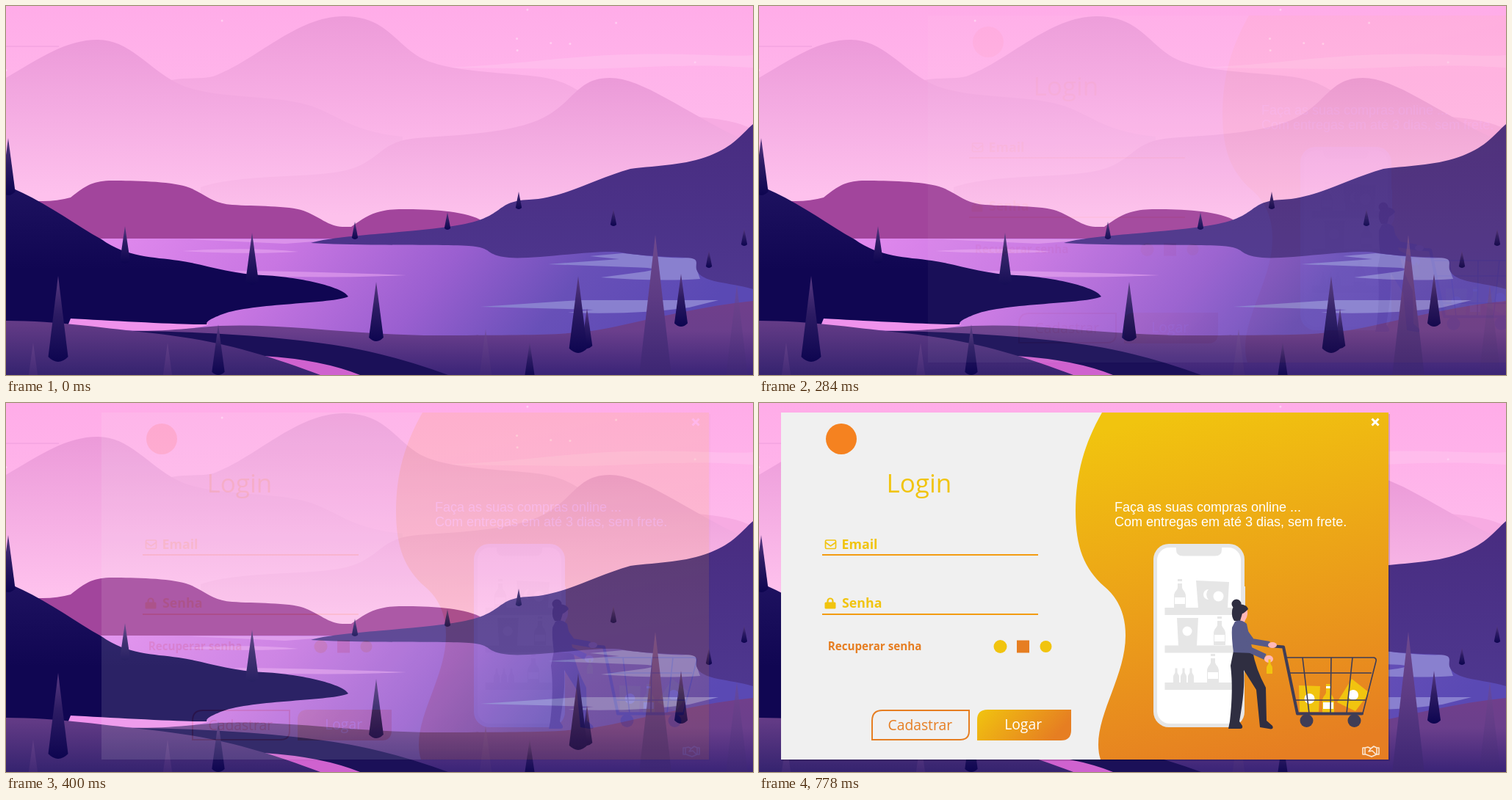
Write an HTML page that moves like this. It is 1017 by 503 pixels and loops after 930 ms.

```html
<!DOCTYPE html>
<html lang="pt">
<head>
<meta charset="utf-8">
<title>Login</title>
<style>
html, body { margin: 0; width: 100%; height: 100%; overflow: hidden; background: #ffb0e8; }
svg { position: absolute; left: 0; top: 0; display: block; }
.ui { font-family: "Open Sans", sans-serif; }
.pitch { font: 18px "Liberation Sans", Arial, sans-serif; fill: #fff; }
.field { font-weight: 700; font-size: 17.8px; fill: #f1c40f; }
.button { font-size: 19.3px; }
</style>
</head>
<body>
<svg width="1017" height="503" viewBox="0 0 1017 503">
  <defs>
    <linearGradient id="sky" x2="0" y2="1"><stop stop-color="#fface8"/><stop offset=".6" stop-color="#fec4ee"/></linearGradient>
    <linearGradient id="far" x2="0" y2=".7"><stop stop-color="#ed9bd9"/><stop offset="1" stop-color="#fcb7e9"/></linearGradient>
    <linearGradient id="west" x2="0" y2=".9"><stop stop-color="#ec9ad9"/><stop offset="1" stop-color="#fec1ed"/></linearGradient>
    <linearGradient id="east" x2="0" y2=".93"><stop stop-color="#eb9ad8"/><stop offset="1" stop-color="#fdc1ec"/></linearGradient>
    <linearGradient id="lake" y2=".12"><stop stop-color="#e68df0"/><stop offset=".33" stop-color="#c876e2"/><stop offset=".58" stop-color="#9a5fd0"/><stop offset=".78" stop-color="#6850b8"/><stop offset="1" stop-color="#5a49b4"/></linearGradient>
    <linearGradient id="ridge" x2="0" y2="1"><stop stop-color="#482c80"/><stop offset="1" stop-color="#4e378f"/></linearGradient>
    <linearGradient id="cape" x2="0" y2="1"><stop stop-color="#1e1260"/><stop offset=".6" stop-color="#100652"/></linearGradient>
    <linearGradient id="shore" x2="0" y2="1"><stop stop-color="#703f8b"/><stop offset=".4" stop-color="#6b3f8c"/><stop offset="1" stop-color="#3a2477"/></linearGradient>
    <linearGradient id="near" x2="0" y2="1"><stop stop-color="#653c87"/><stop offset="1" stop-color="#35236f"/></linearGradient>
    <linearGradient id="dark" x2="0" y2="1"><stop stop-color="#5a3a82"/><stop offset=".45" stop-color="#2c1b63"/><stop offset="1" stop-color="#0d0550"/></linearGradient>
    <linearGradient id="pale" x2="0" y2="1"><stop stop-color="#6f4a8e"/><stop offset=".4" stop-color="#5d3b84"/><stop offset="1" stop-color="#35216f"/></linearGradient>
    <linearGradient id="sun" gradientUnits="userSpaceOnUse" x1="580" y1="10" x2="690" y2="486"><stop stop-color="#f1c40f"/><stop offset="1" stop-color="#e67e22"/></linearGradient>
    <linearGradient id="cta" y2=".3"><stop stop-color="#f1c40f"/><stop offset="1" stop-color="#e67e22"/></linearGradient>
    <path id="bottle" d="M-3-39H3V-28C3-24 8-22 8-16V0H-8V-16C-8-22-3-24-3-28Z"/>
    <g id="drink"><use href="#bottle"/><path fill="#fff" d="M-7-14H7V-5H-7ZM-3-36H3V-33H-3Z"/></g>
    <path id="shelf" d="M552.500 279H648V289H552.500Z"/>
  </defs>

  <path fill="url(#sky)" d="M0 0H1017V503H0Z"/>
  <path fill="#ffc3ee" opacity=".6" d="M600 84C700 80 760 68 850 66S980 70 1017 67V84C930 78 870 84 780 86Z"/>
  <path stroke="#ee9edc" fill="none" d="M0 55H72"/>
  <g id="stars" fill="#ffcdf1"></g>
  <path fill="#f7abe2" d="M935 150C965 154 990 155 1017 168V200H935Z"/>
  <path fill="url(#far)" d="M225 101C245 97 265 100 282 96C340 75 395 14 460 14S532 62 580 77C625 92 700 91 735 98S775 116 800 125V260H225Z"/>
  <path fill="url(#west)" d="M0 98C48 70 82 46 125 46S192 84 233 105S350 121 400 132S460 170 540 178V280H0Z"/>
  <path fill="url(#east)" d="M265 247C325 227 428 236 470 222S510 184 560 180S690 174 732 152S778 98 822 98S925 145 995 178L1017 190V300H265Z"/>
  <path fill="#a2459c" d="M0 266H50Q70 266 88 261C106 247 116 238 145 238S222 239 245 246S278 269 308 271S385 272 405 279S440 301 458 301H470C492 285 505 277 540 277S622 279 645 291V318H0Z"/>
  <path fill="url(#lake)" d="M80 317H1017V460H80Z"/>
  <path fill="#ef92ec" d="M84 427C150 425 220 434 275 433Q280 438 200 444L84 436Z"/>
  <path fill="#ecaaf3" opacity=".55" d="M250 318H460L380 324ZM240 334Q330 328 398 335Q330 339 240 334ZM310 361Q430 362 545 367Q430 372 335 367Z"/>
  <g fill="#8980cf">
    <path d="M738 352L835 345L795 341L840 337C870 340 905 345 935 343Q944 347 940 358L945 372Q890 376 810 370L870 362Q900 357 850 356Z"/>
    <path d="M646 410L780 401H970L930 411Q860 421 765 418L800 414Z"/>
  </g>
  <path fill="url(#ridge)" d="M415 323C450 312 560 309 620 298S665 266 712 264S800 236 850 222C890 217 925 217 958 204S1000 176 1017 161V386C985 376 946 378 940 359C938 350 946 344 925 343S866 341 838 336S720 346 685 343S665 329 630 327S470 327 415 323Z"/>
  <path fill="url(#cape)" d="M0 245C50 264 90 296 130 318C165 343 200 342 235 347S305 365 350 367S458 382 466 396C446 406 335 405 295 420S288 434 262 434S140 429 88 426L84 436H0Z"/>
  <path fill="url(#shore)" d="M150 442C210 445 250 439 290 436C385 432 480 450 600 449S770 450 830 437S950 409 1017 402V503H150Z"/>
  <path fill="#1b1058" d="M160 443C270 443 400 452 480 468Q540 480 602 503H425C350 472 260 452 160 443Z"/>
  <path fill="#cf62cf" d="M350 477Q430 482 482 503H415Z"/>
  <path fill="url(#near)" d="M0 429C70 429 140 440 200 446C290 456 350 474 428 503H0Z"/>
  <g id="trees"></g>

  <g id="panel" class="ui">
    <path fill="#000" opacity=".14" d="M32 15H859V488H32Z"/>
    <path fill="#f0f0f0" d="M30 13H857V486H30Z"/>
    <path fill="url(#sun)" d="M467 13C443 55 431 97 431 147S443 226 470 250Q499 274 499 317C499 370 462 420 462 466Q462 477 465 486H857V13Z"/>
    <circle cx="112" cy="49" r="21" fill="#f58220"/>
    <path stroke="#fff" stroke-width="3" d="M834.500 21.500l9 9m0-9l-9 9"/>

    <text x="173.500" y="122" font-size="35" fill="#f1c40f">Login</text>
    <g class="field"><text x="112.500" y="199">Email</text><text x="113" y="279">Senha</text></g>
    <path fill="#f39c12" d="M86 206h294v2h-294zm0 81h294v2h-294z"/>
    <g fill="none" stroke="#f1c40f" stroke-width="1.700">
      <rect x="90.500" y="187" width="14" height="11.500" rx="1.500"/>
      <path d="M90.500 190l7 5l7-5"/>
      <path stroke-width="2.200" d="M93.500 273v-3a3.500 3.500 0 0 1 7 0v3"/>
    </g>
    <rect x="89.500" y="271.500" width="15" height="9" rx="1.500" fill="#f1c40f"/>
    <text x="93.700" y="337" font-size="15.200" font-weight="700" fill="#e67e22">Recuperar senha</text>
    <circle cx="328.500" cy="332" r="9" fill="#f1c40f"/>
    <path fill="#e67e22" d="M351 323.500h17v17h-17z"/>
    <circle cx="390.500" cy="332" r="8" fill="#f1c40f"/>

    <path fill="none" stroke="#e67e22" stroke-width="2" d="M168 419H286V447Q286 459 274 459H154V433Q154 419 168 419Z"/>
    <path fill="url(#cta)" d="M311 418H425V446Q425 460 411 460H297V432Q297 418 311 418Z"/>
    <g class="button"><text x="175.500" y="446" fill="#e67e22">Cadastrar</text><text x="334.200" y="445" fill="#fff">Logar</text></g>

    <g class="pitch"><text x="484" y="148">Faça as suas compras online ...</text><text x="484" y="168">Com entregas em até 3 dias, sem frete.</text></g>

    <g fill="#e6e6e6">
      <rect x="537" y="192" width="124" height="250" rx="21"/>
      <path d="M660 250h2v31h-2z"/>
      <rect x="542" y="197" width="114" height="240" rx="17" fill="#fff"/>
      <path d="M568 196H630V200Q630 208.500 621 208.500H577Q568 208.500 568 200Z"/>
      <use href="#shelf"/><use href="#shelf" y="51.500"/><use href="#shelf" y="102"/>
      <path d="M595 242L640 244L638 279H598ZM569 293H598L596 331H571Z"/>
      <use href="#drink" x="573" y="279"/>
      <use href="#drink" x="627" y="330"/>
      <use href="#drink" x="618" y="381"/>
      <g id="minis"></g>
      <path fill="#fff" d="M612 254A7 7 0 1 0 612 268A10 10 0 0 1 612 254Z"/>
      <g fill="#fff"><circle cx="625.500" cy="263.500" r="7"/><circle cx="583" cy="311" r="6.500"/></g>
    </g>

    <g fill="#f1c40f">
      <path d="M735 385L764 386L762 421H736ZM807 376L831 395L812 420L787 408Z"/>
      <use href="#drink" x="775" y="422"/>
      <g fill="#fff"><circle cx="749.500" cy="403" r="7"/><circle cx="809" cy="398" r="7"/></g>
    </g>
    <g fill="none" stroke="#3f3d56" stroke-width="1.600" stroke-linejoin="round">
      <path d="M718 347H837Q841 348 840 352L822 423M723 368H834M730 405H827M740 347L749 423M779 347L778 423M808 347L800 423"/>
      <path stroke-width="4" stroke-linecap="round" d="M694 331L714 332.500L733 423.500H821"/>
    </g>
    <g fill="#3f3d56"><circle cx="745.500" cy="433" r="9"/><circle cx="810.500" cy="433" r="9"/></g>

    <g fill="#2f2e41">
      <path fill="#ffb8b8" d="M651 280L664 279Q667 289 662 296L659 303H650Z"/>
      <circle cx="650" cy="274" r="6.500"/>
      <path d="M644 284C644 272 664 272 666 281Q660 287 658 287L655 297H647Q643 291 644 284Z"/>
      <path d="M646 338H672Q676 362 690 388L691 433L699 440Q701 444 697 444.500L682 442L677 391L660 364Q662 390 654 434L658 440Q659 444 655 444H639L641 434Q646 390 642 358Z"/>
      <path fill="#575a89" d="M648 298Q656 294 664 301L668 320L673 341L646 340Q643 318 644 306Z"/>
      <path fill="none" stroke="#575a89" stroke-width="8" stroke-linejoin="round" d="M661 311L671 325L695 329M652 309L663 334L689 346"/>
      <g fill="#ffb8b8"><ellipse cx="699" cy="330" rx="6" ry="4"/><ellipse cx="694" cy="349" rx="6" ry="5"/></g>
      <use href="#bottle" fill="#f1c40f" transform="translate(695 369) scale(.5)"/>
    </g>

    <path fill="none" stroke="#fbe7d3" stroke-width="1.600" stroke-linejoin="round" d="M822 470H825L829 469L833 471L837 468L841 470H844V479H841L834 482L826 479H822ZM825 470V479M841 470V479M833 471L830 475L835 474L840 479"/>
  </g>
</svg>
<script>
const fill = (id, parts) => { document.getElementById(id).innerHTML = parts.join(''); };
const repeat = (count, draw) => Array.from({ length: count }, (_, i) => draw(i));

// A cone with a rounded foot; its width follows from its height.
const tree = (x, base, height, paint = 'dark', opacity = 1) => {
  const half = 1.8 + height * .1;
  const rim = base - half / 2;
  return `<path fill="url(#${paint})" opacity="${opacity}" d="M${x} ${base - height}L${x + half} ${rim}Q${x} ${base + half / 2} ${x - half} ${rim}Z"/>`;
};
const farTree = (x, base) => tree(x, base, 24);
const mistTree = (x, height) => tree(x, 520, height, 'pale', .55);

fill('trees', [
  tree(884, 525, 213, 'pale'), mistTree(653, 80), mistTree(995, 140), mistTree(220, 61), mistTree(37, 61),
  farTree(475, 318), farTree(601, 305), farTree(698, 277), farTree(827, 300), farTree(957, 357), farTree(1005, 327),
  tree(3, 258, 78), tree(162, 351, 51), tree(335, 380, 71), tree(71, 485, 117), tree(504, 457, 81),
  tree(919, 437, 72), tree(791, 467, 55), tree(779, 473, 105), tree(289, 503, 69), tree(713, 508, 50)
]);

let seed = 7;
const random = () => (seed = seed * 16807 % 2147483647) / 2147483647;
fill('stars', repeat(12, () => `<circle cx="${random() * 1017}" cy="${random() * 95}" r="1.5"/>`));

fill('minis', repeat(3, i => `<use href="#bottle" transform="translate(${568 + 10 * i} 381) scale(.5)"/>`));

// The panel slides in by equal hops while fading up, then snaps to solid.
const loop = 930, hop = 50, fade = .04;
const starts = [0, 230, 320, 400, 470, 550];
const last = starts.length - 1;
const frames = starts.map((time, i) => ({
  offset: time / loop,
  transform: `translateX(${hop * (last - i)}px)`,
  opacity: i < last ? fade * i : 1,
  easing: 'step-end'
}));
document.getElementById('panel').animate(
  [...frames, { ...frames[last], offset: 1 }],
  { duration: loop, iterations: Infinity }
);
</script>
</body>
</html>
```
